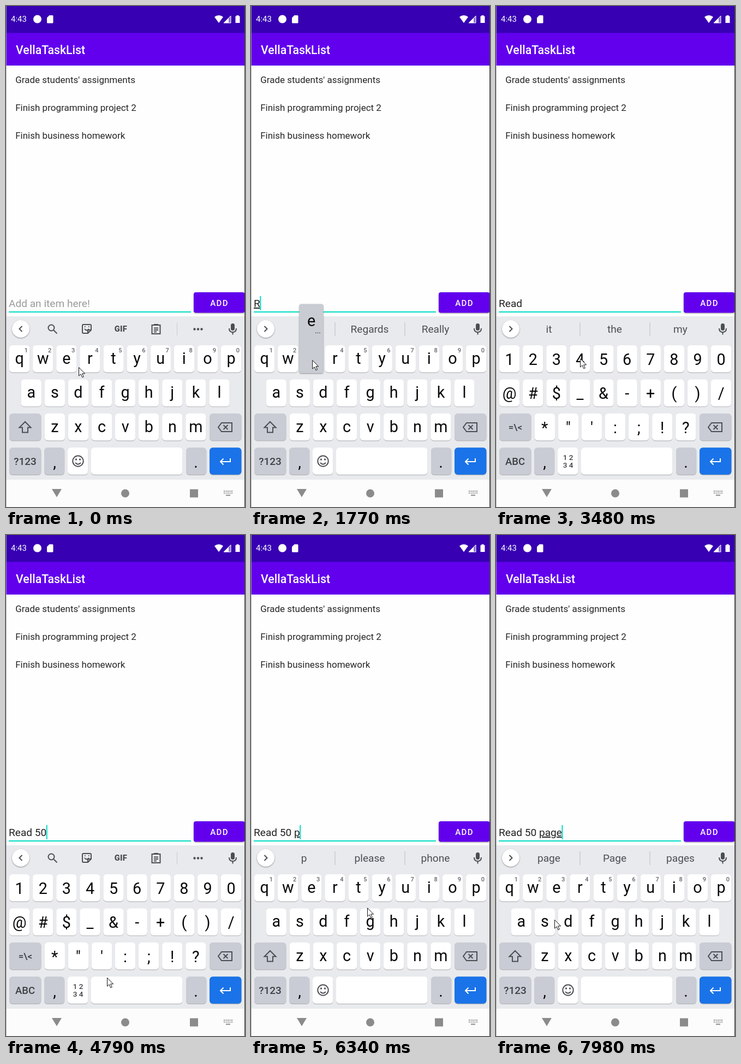
Animation of 438x917 px, one loop 8000 ms. Source, as an HTML page:

```html
<!DOCTYPE html>
<html lang="en">
<head>
<meta charset="utf-8">
<title>Todo list typing</title>
<style>
html, body { margin: 0; width: 100%; height: 100%; overflow: hidden; background: #fff; }
svg { display: block; width: 100vw; height: 100vh; font-family: Roboto, sans-serif; }
text { white-space: pre; }
.mid { text-anchor: middle; }
.med { font-weight: 500; }
.item { font-size: 17px; fill: #252525; }
.field { font-size: 19.1px; fill: #212121; }
.word { text-decoration: underline; text-decoration-thickness: 1.2px; text-underline-offset: 1.5px; text-decoration-skip-ink: none; }
.chip { font-size: 19.1px; fill: #4b4e53; text-anchor: middle; }
.key { font-size: 28.7px; fill: #080808; text-anchor: middle; }
.hint { font-size: 11px; font-weight: 500; fill: #5f6368; text-anchor: middle; }
.fn { font-weight: 500; fill: #3c4043; text-anchor: middle; }
.line { fill: none; stroke: #4b4e53; stroke-width: 2; }
.raised { filter: drop-shadow(0 1px 1.2px rgba(0, 0, 0, .4)); }
</style>
</head>
<body>
<svg viewBox="0 0 438 917">
  <rect width="438" height="917" fill="#fefefe"/>
  <rect width="438" height="109" fill="#6200ee"/>
  <rect width="438" height="49.400" fill="#3700b3"/>
  <g fill="#fff">
    <text x="9" y="29" font-size="15">4:43</text>
    <circle cx="57.500" cy="24" r="7.500"/>
    <path d="M79.500 17H85q1.500 0 1.500 1.500V30q0 1.500-1.500 1.500h-8.500Q75 31.500 75 30v-8.500z"/>
    <path d="M382 20q8-6 16 0l-8 11z"/>
    <path d="M412 18v13h-13z" opacity=".45"/>
    <path d="M408 22v9h-9z"/><path d="M412 18v13h-13z" fill="none" stroke="#fff"/>
    <path d="M422.500 17h4v1.500h2V31h-8V18.500h2z"/>
    <text x="18" y="87.500" font-size="21.300" class="med">VellaTaskList</text>
  </g>
  <g class="item">
    <text x="17.200" y="141">Grade students' assignments</text>
    <text x="17.200" y="192">Finish programming project 2</text>
    <text x="17.200" y="243">Finish business homework</text>
  </g>
  <rect x="5" y="559" width="334" height="2" fill="#03dac5"/>
  <text id="prompt" class="field" x="5" y="551" style="fill:#9b9b9b">Add an item here!</text>
  <text id="field" class="field" x="5" y="551"><tspan id="done"></tspan><tspan id="word" class="word"></tspan></text>
  <rect id="caret" y="531" width="2" height="26" fill="#03dac5"/>
  <rect class="raised" x="344" y="524" width="93.500" height="37.500" rx="4" fill="#6200ee"/>
  <text x="391" y="549" class="mid med" font-size="15" letter-spacing="1.300" fill="#fff">ADD</text>

  <rect y="568" width="438" height="300" fill="#e8eaed"/>
  <circle class="raised" cx="27" cy="591" r="16" fill="#fff"/>
  <path id="chevron" class="line"/>
  <g id="tools">
    <g class="line">
      <circle cx="83" cy="589" r="5.500"/><path d="M87 593l6.500 6.500"/>
      <path d="M142 583h12q2 0 2 2v8l-6 6h-8q-2 0-2-2v-12q0-2 2-2zM156 593h-4q-2 0-2 2v4M144 591q4 5 8 0M144 587h1.500M151 587h1.500"/>
      <path d="M267.500 584h15v16h-15zM271 589.500h8M271 593h8M271 596.500h5M271 583h8"/>
    </g>
    <text x="210.500" y="596" font-size="14.700" font-weight="900" letter-spacing=".3" fill="#4b4e53" class="mid">GIF</text>
    <path d="M313.500 580v23" stroke="#c9ccd1"/>
    <path d="M345.500 591.500h14" stroke="#4b4e53" stroke-width="4.400" stroke-linecap="round" stroke-dasharray="0 6.500"/>
  </g>
  <g id="chips">
    <path d="M154 579v25M282 579v25" stroke="#c4c7cc" stroke-width="1.300"/>
    <text class="chip" x="97" y="598"></text>
    <text class="chip" x="217.500" y="598"></text>
    <text class="chip" x="338" y="598"></text>
  </g>
  <rect x="412" y="581" width="7" height="13" rx="3.500" fill="#4b4e53"/>
  <path d="M409 590q0 7 6.500 7t6.500-7M415.500 597v4.500" class="line"/>

  <g id="boards"></g>
  <rect id="press" height="50" rx="5.500" opacity=".13"/>
  <g id="popup">
    <rect class="raised" width="44" height="126.500" rx="4" fill="#c9ccd3"/>
    <text id="glyph" class="key" x="22" y="40"></text>
    <text id="more" x="34" y="53" class="mid" font-size="13">...</text>
  </g>

  <rect y="867" width="438" height="50" fill="#fcfcfc"/>
  <g fill="#8b8b8b">
    <path d="M84 884h18l-9 15z"/><circle cx="218.500" cy="892" r="7.500"/><rect x="337" y="884.500" width="15" height="15"/>
    <path d="M399 888h16M399 891.500h16" stroke="#8b8b8b" stroke-width="2" stroke-dasharray="2 1.500"/><rect x="403" y="894.500" width="8" height="2"/>
  </g>
  <path d="M.5 0v917" stroke="#aaa" opacity=".8"/>
  <path d="M437.500 0v917" stroke="#3c3c3c"/>
  <path id="mouse" d="M.5 .5v15.500l3.600-3.300 2.700 6 2.500-1.100-2.700-5.800h5z" fill="#fff" stroke="#111"/>
</svg>
<script>
const LOOP = 8000, HOLD = 100, TRAVEL = 340, BLINK = 500;
const PITCH = 43.1, KEY = 37.3, WIDE = 58.5, GREY = '#c9ccd4';
const $ = id => document.getElementById(id);
const rowY = r => 621 + 62.4 * r;
const keys = {};

function add(parent, tag, attrs, text) {
  const node = document.createElementNS('http://www.w3.org/2000/svg', tag);
  for (const name in attrs) node.setAttribute(name, attrs[name]);
  if (text) node.textContent = text;
  parent.append(node);
}

function cap(g, name, x, row, w, fill = '#fff') {
  const y = rowY(row);
  add(g, 'rect', { x, y: y + 1.2, width: w, height: 49.5, rx: 6, opacity: .22 });
  add(g, 'rect', { x, y, width: w, height: 49.5, rx: 6, fill });
  keys[name] = { x, y, w };
}

const label = (g, cls, x, y, text, size) =>
  add(g, 'text', { class: cls, x, y, ...(size && { 'font-size': size }) }, text);

const icon = (g, d, style = '') => add(g, 'path', { class: 'line', d, style });

function board(rows, mode) {
  const g = document.createElementNS('http://www.w3.org/2000/svg', 'g');
  const symbols = mode === 'symbols';
  $('boards').append(g);
  rows.forEach((chars, r) => [...chars].forEach((ch, i) => {
    const x = 6 + PITCH * (i + (r === 2 ? 1.5 : (10 - chars.length) / 2)), y = rowY(r);
    cap(g, ch, x, r, KEY);
    label(g, 'key', x + KEY / 2, y + (symbols ? 36 : 34), ch);
    if (!symbols && !r) label(g, 'hint', x + 31, y + 13, (i + 1) % 10 + '');
  }));
  cap(g, 'shift', 6, 2, WIDE, GREY);
  cap(g, 'delete', 373, 2, WIDE, GREY);
  cap(g, 'mode', 6, 3, WIDE, GREY);
  cap(g, ',', 70, 3, KEY, GREY);
  cap(g, 'emoji', 113, 3, KEY);
  cap(g, ' ', 156, 3, 167.5);
  cap(g, '.', 330, 3, KEY, GREY);
  cap(g, 'enter', 373, 3, WIDE, '#1a73e8');
  label(g, 'key', 89, 845, ',');
  label(g, 'key', 348, 845, '.');
  icon(g, 'M395 763h19v16h-19l-6-8zM398.500 767l8 8m0-8l-8 8');
  icon(g, 'M411 828v6h-18m5.500-5.500l-5.500 5.500 5.500 5.500', 'stroke:#fff');
  if (symbols) {
    label(g, 'fn', 35.5, 777, '=\\<', 17);
    label(g, 'fn', 35, 840, 'ABC', 18.5);
    label(g, 'fn', 132, 831, '1 2', 13.5);
    label(g, 'fn', 132, 845, '3 4', 13.5);
  } else {
    icon(g, 'M35 761l10.500 10.500h-5.500v9h-10v-9h-5.500z', mode === 'upper' ? 'fill:#4b4e53' : '');
    label(g, 'fn', 35, 840, '?123', 19);
    add(g, 'circle', { class: 'line', cx: 132, cy: 833, r: 9.7 });
    icon(g, 'M127 836q5 5.500 10 0');
    icon(g, 'M128.500 828.500v3M135.500 828.500v3', 'stroke-width:2.800');
  }
  return g;
}

const letters = ['qwertyuiop', 'asdfghjkl', 'zxcvbnm'];
const boards = {
  lower: board(letters, 'lower'),
  upper: board(letters.map(s => s.toUpperCase()), 'upper'),
  symbols: board(['1234567890', '@#$_&-+()/', '*"\':;!?'], 'symbols')
};

// Every key press: start time and key; it takes effect on release
const strokes = [[880, 'shift'], [1400, 'R'], [1750, 'e'], [2240, 'a'], [2440, 'd'], [2790, ' '], [3190, 'mode'],
  [4090, '5'], [4450, '0'], [5030, ' '], [5280, 'mode'], [6060, 'p'], [6860, 'a'], [7200, 'g'], [7700, 'e']];

// Places where the pointer pauses off the keys: arrival, departure, x, y
const pauses = [[0, 40, 133, 661], [190, 430, 150, 650], [560, 800, 80, 753], [3480, 3490, 154, 645],
  [4790, 4890, 185, 810], [5560, 5630, 30, 844], [5800, 5960, 354, 685], [7970, LOOP, 107, 704]];

const stops = strokes.map(([t, k]) => [t - 30, t + HOLD, keys[k].x + 20, keys[k].y + 27])
  .concat(pauses).sort((a, b) => a[0] - b[0]);

const chips = {
  R: 'R|Regards|Really', Re: 'Re|Regards|Really', Rea: 'Rea|Really|Ready', Read: 'Read|Reading|Ready',
  'Read ': 'it|the|my', '50 ': 'and|to|min', p: 'p|please|phone', pa: 'pa|page|pay',
  pag: 'pag|page|pages', page: 'page|Page|pages'
};

// Replays all presses released by time t
function typedAt(t) {
  const s = { text: '', mode: 'lower', since: -BLINK };
  for (const [start, key] of strokes) {
    const end = start + HOLD;
    if (end > t) break;
    if (key === 'shift') s.mode = 'upper';
    else if (key === 'mode') s.mode = s.mode === 'symbols' ? 'lower' : 'symbols';
    else {
      s.text += key;
      s.since = end;
      if (s.mode === 'upper') s.mode = 'lower';
    }
  }
  return s;
}

function pointer(t) {
  const i = stops.findLastIndex(p => p[0] <= t), a = stops[i], b = stops[i + 1] || a;
  const span = Math.min(TRAVEL, b[0] - a[1]);
  const u = t > a[1] ? Math.min(1, (t - a[1]) / span) : 0, k = u * u * (3 - 2 * u);
  return [a[2] + (b[2] - a[2]) * k, a[3] + (b[3] - a[3]) * k];
}

const show = (node, on) => node.style.display = on ? '' : 'none';

function draw(t) {
  const { text, mode, since } = typedAt(t);
  const word = text.match(/[a-z]*$/i)[0];
  $('done').textContent = text.slice(0, text.length - word.length);
  $('word').textContent = word;
  show($('prompt'), !text);
  show($('caret'), (t - since) % (2 * BLINK) < BLINK);
  $('caret').setAttribute('x', 4.5 + (text ? $('field').getComputedTextLength() : 0));

  const words = chips[text.match(/\S* ?$/)[0]];
  show($('chips'), words);
  show($('tools'), !words);
  if (words) words.split('|').forEach((s, i) => $('chips').children[i + 1].textContent = s);
  $('chevron').setAttribute('d', words ? 'M24.500 586l5 5-5 5' : 'M29.500 586l-5 5 5 5');
  for (const name in boards) show(boards[name], name === mode);

  const key = strokes.find(([s]) => t >= s && t < s + HOLD)?.[1];
  const popped = key && /^\w$/.test(key);
  show($('popup'), popped);
  show($('press'), key && !popped);
  if (key) {
    const { x, y, w } = keys[key];
    $('popup').setAttribute('transform', `translate(${x - 3.7} ${y - 75.5})`);
    $('glyph').textContent = key;
    show($('more'), !'dg'.includes(key));
    $('press').setAttribute('x', x);
    $('press').setAttribute('y', y);
    $('press').setAttribute('width', w);
  }
  $('mouse').setAttribute('transform', `translate(${pointer(t)})`);
}

const start = performance.now();
function tick(now) {
  draw(Math.max(0, now - start) % LOOP);
  requestAnimationFrame(tick);
}
draw(0);
requestAnimationFrame(tick);
</script>
</body>
</html>
```
